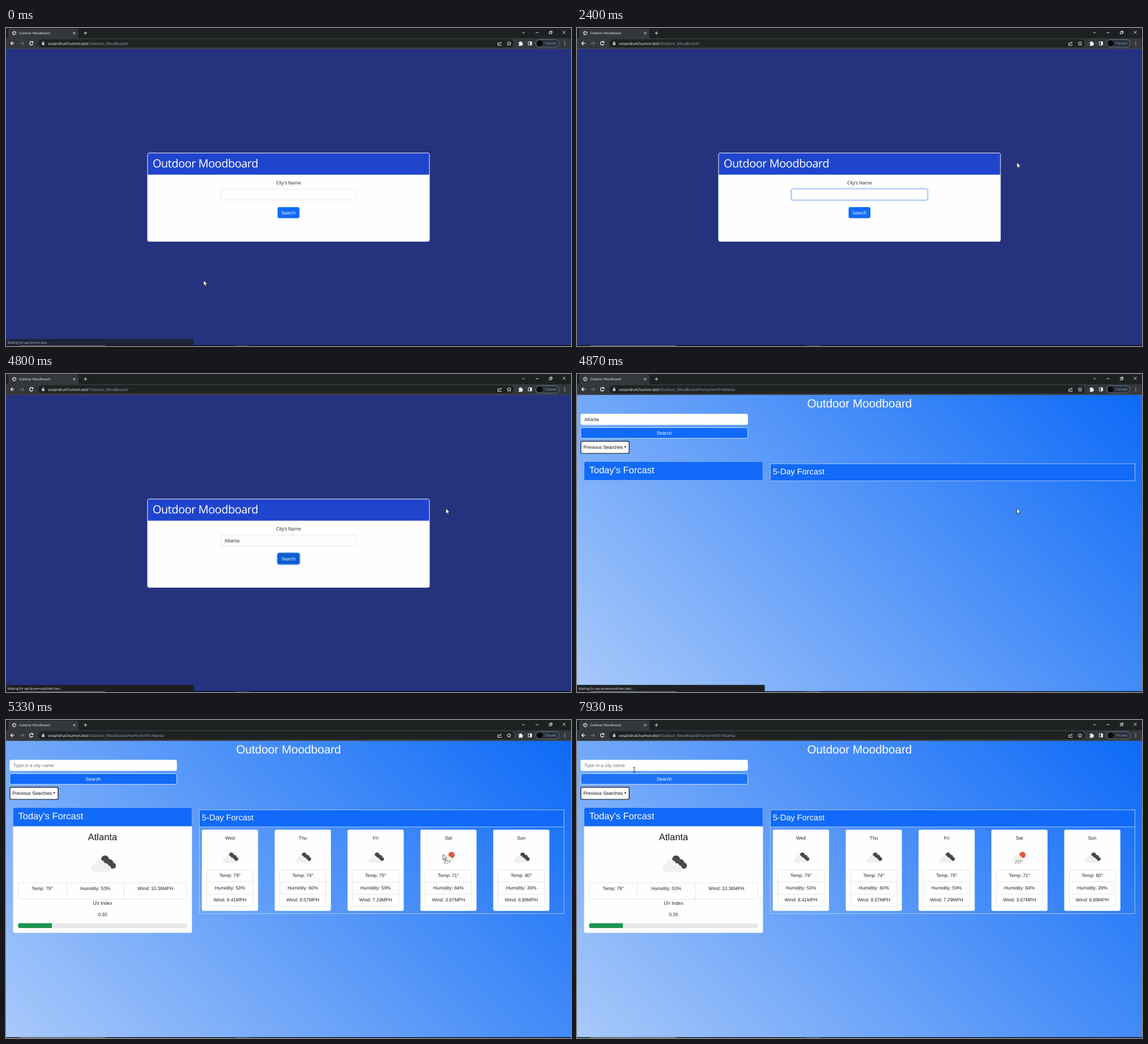
Animation of 998x561 px, one loop 8000 ms. Source, as an HTML page:

```html
<!DOCTYPE html>
<html lang="en">
<head>
<meta charset="utf-8">
<title>Outdoor Moodboard</title>
<style>
  html, body { margin: 0; width: 100%; height: 100%; overflow: hidden; background: #000; }
  svg { display: block; width: 100vw; height: 100vh; }
  text { font-family: "Liberation Sans", Arial, sans-serif; font-size: 8.32px; text-rendering: geometricPrecision; white-space: pre; }
  .ui { font-family: "Open Sans", "Noto Sans", sans-serif; letter-spacing: -.025em; }
  .mid { text-anchor: middle; }
  .icon { fill: none; stroke: #dfe1e3; stroke-width: 1; }
</style>
</head>
<body>
<svg id="stage" viewBox="0 0 998 561" preserveAspectRatio="none"></svg>
<script>
const LOOP = 8000, BLUE = '#116af8', INK = '#212529', LINE = '#dee2e6';
const NAME = 'Outdoor Moodboard';

const rect = (x, y, w, h, fill, r = 0, extra = '') =>
  `<rect x="${x}" y="${y}" width="${w}" height="${h}" rx="${r}" fill="${fill}" ${extra}/>`;
const outline = (x, y, w, h, fill, r, color, width = 1) =>
  rect(x, y, w, h, fill, r, `stroke="${color}" stroke-width="${width}"`);
const text = (x, y, str, fill = INK, size = 8.32, cls = '', id = '') =>
  `<text x="${x}" y="${y}" fill="${fill}" class="${cls}" id="${id}" style="font-size:${size}px">${str}</text>`;
const icon = (d, extra = '') => `<path class="icon" d="${d}" ${extra}/>`;
const dot = (x, y, r, fill) => `<circle cx="${x}" cy="${y}" r="${r}" fill="${fill}"/>`;

const browser = () =>
  rect(0, 0, 998, 18, '#1e2122') +
  rect(0, 18, 998, 19, '#34383a') +
  rect(0, 36.2, 998, .8, '#4b5053') +
  `<path d="M1 18Q4 18 4 15V4Q4 1 7 1H125Q128 1 128 4V15Q128 18 131 18Z" fill="#34383a"/>` +
  `<circle cx="14.5" cy="9" r="3.2" class="icon"/>` +
  icon('M11.6 8Q14 8.4 13.8 10T15 12M13.6 6Q14.4 8 17.4 7.6') +
  text(23, 11.1, NAME, '#eceeef', 5.9, 'ui') +
  icon('M118.5 7l4 4m0-4l-4 4') +
  icon('M137.3 9h6M140.3 6v6', 'stroke-width="1.2"') +
  icon('M911.8 7l2.3 2.3L916.4 7', 'stroke-width=".8"') +
  icon('M935.5 8.2h5') +
  icon('M959.6 6.8h3.6v3.6h-3.6zM961 6.5V5.4h3.6V9h-1', 'stroke-width=".8"') +
  icon('M983.3 5l5.2 5.2m0-5.2l-5.2 5.2') +
  icon('M15 27H8.5m3-3l-3 3 3 3', 'style="stroke:#fff;stroke-width:1.2"') +
  icon('M24.8 27h6.5m-3-3l3 3-3 3', 'style="stroke:#85898b"') +
  icon('M47.1 25A3.1 3.1 0 1 0 47.6 28', 'style="stroke:#fff;stroke-width:1.2"') +
  `<path d="M48.2 23v3.3h-3.3z" fill="#fff"/>` +
  rect(57, 20, 840, 14, '#1f2223', 7) +
  rect(63.3, 26.3, 4.6, 3.6, '#c9cccd', .5) +
  icon('M64.4 26.3v-1.1a1.2 1.2 0 0 1 2.4 0v1.1', 'stroke-width=".8"') +
  `<text class="ui" x="74" y="29.6" fill="#f4f5f5" style="font-size:7px">vosandru4.humon.test<tspan fill="#9aa0a4">/Outdoor_Moodboard/</tspan><tspan id="query" fill="#9aa0a4">home.html?=Atlanta</tspan></text>` +
  icon('M870.5 26h-1.7v4.6h6v-1.3M870.6 28.6q.4-2.8 3.8-2.8m-1.3-1.7l1.8 1.7-1.8 1.8', 'stroke-width=".7"') +
  icon('M888.5 23.6l1.1 2.3 2.5.3-1.9 1.7.5 2.5-2.2-1.2-2.2 1.2.5-2.5-1.9-1.7 2.5-.3z', 'stroke-width=".8"') +
  `<path d="M905.5 24.8h2a1.3 1.3 0 0 1 2.6 0h1.8v2a1.3 1.3 0 0 1 0 2.6v1.8h-6.4v-2a1.2 1.2 0 0 0 0-2.4z" fill="#f1f2f2"/>` +
  icon('M922.5 24.2h6v5.8h-6z') + rect(925.6, 24, 3, 6, '#f1f2f2') +
  outline(935.5, 20.5, 41.5, 13.2, '#293038', 6.6, '#73869b', .8) +
  dot(942.5, 27.1, 5, '#070808') +
  text(952, 29.3, 'Paused', '#7f9fcd', 6, 'ui') +
  [24.3, 27.2, 30.1].map(y => dot(987, y, .75, '#eceeef')).join('');

const searchPage = () =>
  rect(0, 37, 998, 523, '#25337f') +
  outline(250, 220.5, 498, 156, '#fdfefd', 3, '#e9ecf2') +
  `<path d="M250.5 258.8V223Q250.5 221 252.5 221H745.5Q747.5 221 747.5 223V258.8Z" fill="#2045cd"/>` +
  text(259, 245.5, NAME, '#fff', 20, 'ui" font-weight="500') +
  text(499, 276.4, "City's Name", INK, 8.3, 'ui mid') +
  `<g id="fieldRing">${outline(379, 284, 240, 19.3, 'none', 3.5, '#c2d9fc', 4)}</g>` +
  outline(379, 284, 240, 19.3, '#fdfefd', 3, LINE, .8) +
  `<g id="fieldEdge">${outline(379, 284, 240, 19.3, 'none', 3, '#8dbafc', .8)}</g>` +
  text(386, 296.7, '', INK, 8.3, 'ui', 'typed') +
  `<path id="clear" d="M605.5 291l5 5m0-5l-5 5" stroke="#2f7de8" stroke-width="1.1"/>` +
  `<rect id="caret" y="288" width=".8" height="11" fill="${INK}"/>` +
  `<g id="buttonRing">${outline(480, 316.3, 38, 19, 'none', 3.5, '#8db8fb', 4)}</g>` +
  rect(479.7, 316, 38.6, 19.6, '#116af8', 3, 'id="button"') +
  text(499, 328.9, 'Search', '#fff', 8.3, 'ui mid');

const cloud = (cx, cy, scale) => `<g transform="translate(${cx} ${cy}) scale(${scale})">` +
  dot(4, -8, 7, '#484848') + dot(12, -2, 6.5, '#484848') + dot(18, 3, 5.2, '#484848') +
  rect(3, -6, 14, 13.8, '#484848') + paleCloud + '</g>';
const paleCloud = `<path d="M-16 14A6.8 6.8 0 0 1 -14.5 1A9.3 9.3 0 0 1 3.5 -1.5A6 6 0 0 1 10 2.6A6 6 0 0 1 11 14Z" fill="#f0f0ef"/>`;
const shower = (cx, cy) => dot(cx + 5.3, cy - 4.8, 5.6, '#dd5b43') +
  `<g transform="translate(${cx - .2} ${cy - 1}) scale(.6)">${paleCloud}</g>` +
  [[-5, 5], [-1, 4.5], [3, 4.5], [-6, 8.5], [-2, 8.5], [1.5, 7.5]].map(([x, y]) =>
    `<path d="M${cx + x} ${cy + y}l-1 1.7" stroke="#444" stroke-width="1.3"/>`).join('');

const dayCard = ([day, temp, humidity, wind], i) => {
  const x = 346 + i * 128.65, c = x + 49.6, left = x + 8.6;
  return rect(x, 193.5, 99.2, 143.3, '#fdfefd', 3) +
    text(c, 211, day, INK, 8.32, 'mid') +
    (day === 'Sat' ? shower(c, 243) : cloud(c, 243.3, .63)) +
    outline(left, 264, 82, 64.2, 'none', 3, LINE, .8) +
    [285.4, 306.8].map(y => rect(left, y, 82, .7, LINE)).join('') +
    [`Temp: ${temp}°`, `Humidity: ${humidity}%`, `Wind: ${wind}MPH`].map((s, row) =>
      text(c, 277.4 + row * 21.3, s, INK, 8.32, 'mid')).join('');
};

const forecast = () =>
  `<path d="M12.5 187.5H328.5V372.5Q328.5 375.5 325.5 375.5H15.5Q12.5 375.5 12.5 372.5Z" fill="#fdfefd"/>` +
  text(170.5, 211.5, 'Atlanta', '#16191c', 16.6, 'mid') + cloud(171, 254, 1) +
  outline(21.5, 287, 298, 29.5, 'none', 3, LINE, .8) +
  rect(106.5, 287, .8, 29.5, LINE) + rect(208.3, 287, .8, 29.5, LINE) +
  [[64, 300, 'Temp: 79°'], [157.7, 300, 'Humidity: 53%'], [264, 300, 'Wind: 10.36MPH'],
   [170.5, 325.7, 'UV Index'], [170.5, 346.2, '0.35']].map(([x, y, s]) => text(x, y, s, INK, 8.32, 'mid')).join('') +
  rect(21.3, 358.6, 298.7, 8.3, '#e7eaec', 3) +
  `<path d="M81 358.6H24.3a3 3 0 0 0 -3 3v2.3a3 3 0 0 0 3 3H81Z" fill="#1c954e"/>` +
  outline(341.5, 158.5, 644, 183, 'none', 0, '#b9d3fb', .8) +
  [['Wed', 79, 53, '8.41'], ['Thu', 74, 60, '8.57'], ['Fri', 75, 59, '7.29'],
   ['Sat', 71, 84, '3.67'], ['Sun', 80, 39, '6.89']].map(dayCard).join('');

const resultPage = () =>
  `<linearGradient id="sky" gradientUnits="userSpaceOnUse" x1="0" y1="560" x2="760.5" y2="-200.5">
     <stop stop-color="#a8c9fa"/><stop offset="1" stop-color="#0d6af7"/></linearGradient>` +
  rect(0, 37, 998, 523, 'url(#sky)') +
  text(499, 58.5, NAME, '#fff', 20.7, 'mid') +
  rect(6.3, 70.3, 295.6, 19.4, '#fdfefd', 3) +
  text(13, 82.7, '', INK, 8.32, '', 'city') +
  rect(6.7, 94.6, 295, 18.8, BLUE, 3, 'id="search" stroke="#e4eefd" stroke-width=".9"') +
  text(154, 106.6, 'Search', '#fff', 8.32, 'mid') +
  outline(6.9, 118.6, 85.2, 21.4, '#fdfefd', 2.5, '#0b0e12', 1.2) +
  text(11.5, 132, 'Previous Searches', '#111') +
  `<path d="M83 127.8h4.4l-2.2 2.3z" fill="#111"/>` +
  `<g id="forecast">${forecast()}</g>` +
  `<path d="M12.5 187.5V157.5Q12.5 154.5 15.5 154.5H325.5Q328.5 154.5 328.5 157.5V187.5Z" fill="${BLUE}" stroke="#8fb9fa" stroke-width=".7"/>` +
  text(21.5, 174.8, "Today's Forcast", '#fff', 16.5) +
  outline(341.5, 158.5, 644, 30, BLUE, 0, '#b9d3fb', .8) +
  text(346, 176.9, '5-Day Forcast', '#fff', 14.56);

const cursors = () => `<g id="cursor">
  <path id="arrow" d="M0 0V9.6L2.2 7.6L3.7 11L5.3 10.3L3.8 7H6.7Z" fill="#fff" stroke="#111" stroke-width=".7"/>
  <path id="beam" d="M-2-4.3H-.5L0-3.8L.5-4.3H2M0-3.8V3.8M-2 4.3H-.5L0 3.8L.5 4.3H2" fill="none" stroke="#222" stroke-width=".9"/>
  <path id="hand" d="M-1 1Q0-.4 1 1V5L5.4 5.8Q6.6 6.2 6.4 8L5.4 12H0L-2.8 8Q-3-.2 -1 7Z" fill="#fff" stroke="#111" stroke-width=".7"/></g>`;

const stage = document.getElementById('stage');
stage.innerHTML =
  `<g id="searchPage">${searchPage()}</g><g id="resultPage">${resultPage()}</g>` + browser() +
  rect(0, 559.7, 998, 1.3, '#050606') + rect(24, 560, 151, 1, '#6d7069') + rect(405, 560, 25, 1, '#3a3d3c') +
  `<g id="status">${rect(0, 548.5, 331.7, 11.3, '#1b1f22', 1)}${text(2.5, 556.8, '', '#e6e8e9', 5.9, 'ui', 'message')}</g>` +
  cursors();

const el = {};
stage.querySelectorAll('[id]').forEach(node => { if (node.id) el[node.id] = node; });
const show = (node, visible) => node.setAttribute('visibility', visible ? 'inherit' : 'hidden');
const fade = (node, amount) => node.setAttribute('opacity', amount);
const ramp = (t, from, to) => Math.min(1, Math.max(0, (t - from) / (to - from)));
const smooth = k => k * k * (3 - 2 * k);
const inside = (x, y, l, t, r, b) => x >= l && x <= r && y >= t && y <= b;

// time, x, y of the pointer's hot spot
const route = [[0, 349, 445], [235, 349, 445], [800, 500, 293], [1080, 500, 293], [1330, 777, 237],
  [4870, 777, 237], [5330, 772, 237], [5600, 460, 110], [5670, 330, 83], [5800, 20, 230], [5930, 200, 420],
  [6070, 560, 512], [6200, 904, 400], [6330, 511, 435.5], [6420, 511, 435.5], [7200, 69, 122],
  [7500, 69, 122], [7530, 69, 121.5], [7680, 69, 121.5], [7930, 101, 88], [LOOP, 101, 88]];
const keys = [2600, 3070, 3200, 3330, 3530, 3730, 3800];
const PAGE_TURN = 4870, LOADED = 5130, CLICK = 800, TAB = 4000, BLINK = 533;

function pointerAt(t) {
  const i = Math.max(1, route.findIndex(p => p[0] > t));
  const [t0, x0, y0] = route[i - 1], [t1, x1, y1] = route[i];
  const k = smooth(ramp(t, t0, t1));
  return [x0 + (x1 - x0) * k, y0 + (y1 - y0) * k];
}

function draw(t) {
  const second = t >= PAGE_TURN, loaded = t >= LOADED;
  show(el.searchPage, !second);
  show(el.resultPage, second);
  show(el.forecast, loaded);
  el.query.style.display = second ? '' : 'none';

  const typed = keys.filter(k => k <= t).length;
  const focus = ramp(t, CLICK, CLICK + 150) * (1 - ramp(t, TAB, TAB + 150));
  const pressed = ramp(t, TAB, TAB + 150);
  const lastInput = typed ? keys[typed - 1] : CLICK;
  const editing = t >= CLICK && t < TAB;
  el.typed.textContent = 'Atlanta'.slice(0, typed);
  el.caret.setAttribute('x', 385.4 + (typed ? el.typed.getComputedTextLength() + .4 : 0));
  show(el.caret, !second && editing && Math.floor((t - lastInput) / BLINK) % 2 === 0);
  show(el.clear, !second && editing && typed > 0);
  fade(el.fieldRing, focus);
  fade(el.fieldEdge, focus);
  fade(el.buttonRing, pressed);
  el.button.setAttribute('fill', `rgb(${17 - 5 * pressed},${106 - 13 * pressed},${248 - 40 * pressed})`);

  el.city.textContent = loaded ? 'Type in a city name' : 'Atlanta';
  el.city.setAttribute('fill', loaded ? '#6c757d' : INK);
  const hover = ramp(t, 7780, 7880);
  el.search.setAttribute('fill', `rgb(${17 + 11 * hover},${106 + 9 * hover},${248 - 5 * hover})`);

  el.message.textContent = `Waiting for ${t < 4000 ? 'api.humon.test' : 'api.dunemoodchart.test'}...`;
  fade(el.status, t < 130 ? (t < 70 ? .75 : .35) : t >= 4800 ? 1 - ramp(t, LOADED, LOADED + 130) : 0);

  const [x, y] = pointerAt(t);
  const beam = second ? inside(x, y, 6, 70, 302, 90) : inside(x, y, 379, 284, 619, 303);
  const hand = second && (inside(x, y, 6, 94, 302, 114) || inside(x, y, 6, 118, 92, 140));
  el.cursor.setAttribute('transform', `translate(${x} ${y})`);
  show(el.beam, beam);
  show(el.hand, hand);
  show(el.arrow, !beam && !hand);
}

const start = performance.now();
function tick() {
  draw((performance.now() - start) % LOOP);
  requestAnimationFrame(tick);
}
tick();
</script>
</body>
</html>
```
